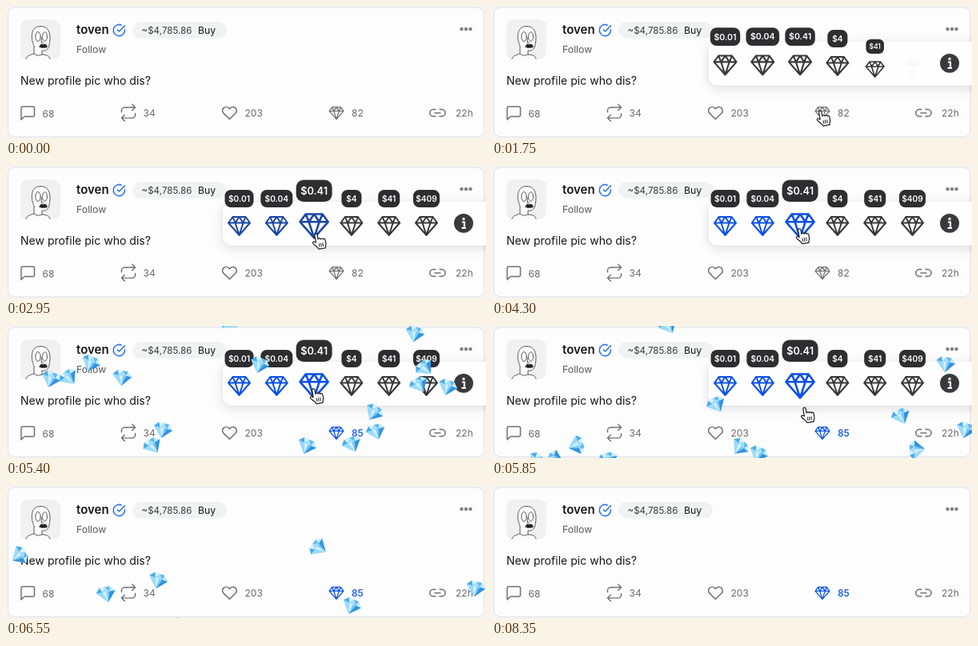
Write an HTML page that moves like this. It is 600 px wide and 166 px high and loops after 9.2 s.

```html
<!DOCTYPE html>
<html lang="en">
<head>
<meta charset="utf-8">
<title>Post card with diamond reactions</title>
<style>
html, body { margin: 0; width: 100%; height: 100%; overflow: hidden; background: #f4f4f5; }
svg { display: block; width: 600px; height: 166px; font-family: Inter, Roboto, sans-serif; }
.icon { fill: none; stroke: #707074; stroke-linecap: round; stroke-linejoin: round; }
.count { font-size: 12px; fill: #68686c; }
.tag { font-size: 10.2px; font-weight: 600; fill: #fff; text-anchor: middle; }
#bar { filter: drop-shadow(0 3px 7px rgba(0, 0, 0, .13)); }
</style>
</head>
<body>
<svg viewBox="0 0 600 166">
  <defs>
    <path id="diamond" d="M-8-11.5H8L13.5-4 0 11.5-13.5-4ZM-13.5-4H13.5M-8-11.5-5-4 0 11.5 5-4 8-11.5M-5-4 0-11.5 5-4"/>
    <g id="gem">
      <path d="M-7-8H6L12-2 1 11-12-2Z" fill="#79c9f4"/>
      <path d="M-7-8-4-2H-12Z" fill="#4aa9ea"/>
      <path d="M-7-8H0L-4-2Z" fill="#d8f3ff"/>
      <path d="M0-8 5-2H-4Z" fill="#a5defa"/>
      <path d="M0-8H6L5-2Z" fill="#5db8f0"/>
      <path d="M6-8 12-2H5Z" fill="#c5ecfe"/>
      <path d="M-12-2H-4L1 11Z" fill="#9cdbf9"/>
      <path d="M5-2H12L1 11Z" fill="#3492df"/>
      <path d="M-4-2H1V11Z" fill="#cdefff"/>
    </g>
  </defs>

  <rect x="2.5" y="2" width="595" height="162.5" rx="8" fill="#fdfdfe" stroke="#e3e3e6"/>

  <rect x="18" y="17" width="50" height="50" rx="9" fill="#f1f1f2"/>
  <g fill="#fcfcfc" stroke="#48484a" stroke-width=".9" stroke-linecap="round">
    <path d="M25 66.5C26 62 31 61.500 35 60V50C31 42 30 25.500 43 25.500S56 39 54 49C53 55 49 57 45 56V61C50 61.500 54 62 55 66.500"/>
    <path d="M35 60Q39 64 45 61" fill="none"/>
    <ellipse cx="40" cy="38.500" rx="3.200" ry="6"/>
    <ellipse cx="48.500" cy="38.500" rx="3" ry="5.800"/>
    <path d="M44.500 40 44 46H46.500" fill="none"/>
    <path d="M42 51.500C42.500 47.500 45 47.500 46.500 48.500 48.500 47.500 51 48 51.500 51.500 49 52.800 44.500 53 42 51.500Z" fill="#222"/>
  </g>

  <text x="88" y="35" font-size="15" font-weight="600" fill="#161618">toven</text>
  <g class="icon" transform="translate(132.800 22) scale(.71)" style="stroke:#2878ec" stroke-width="2.200">
    <path d="M22 11V12a10 10 0 1 1-6-9.140M22 4 12 14 9 11"/>
  </g>
  <rect x="158" y="20" width="118" height="20.500" rx="10.200" fill="#f0f2f3"/>
  <text x="169.500" y="35" font-size="11.600" fill="#3c3c40">~$4,785.86</text>
  <text x="240" y="35" font-size="12.200" fill="#161618">Buy</text>
  <text x="88" y="58.500" font-size="12.300" fill="#58585c">Follow</text>
  <g fill="#808084"><circle cx="569.500" cy="29" r="2.200"/><circle cx="575" cy="29" r="2.200"/><circle cx="580.500" cy="29" r="2.200"/></g>
  <text x="18" y="98.500" font-size="14.050" fill="#161618">New profile pic who dis?</text>

  <g class="icon" stroke-width="1.500">
    <path d="M19 143V128.500a2 2 0 0 1 2-2H33.500a2 2 0 0 1 2 2V137a2 2 0 0 1-2 2H23Z"/>
    <g transform="translate(141.600 122.800) scale(.95)"><path d="M17 1 21 5 17 9M3 11V9A4 4 0 0 1 7 5H21M7 23 3 19 7 15M21 13V15A4 4 0 0 1 17 19H3"/></g>
    <g transform="translate(269.300 124.500) scale(.84)" stroke-width="1.800"><path d="M20.840 4.600a5.500 5.500 0 0 0-7.780 0L12 5.670 10.940 4.600a5.500 5.500 0 0 0-7.780 7.780L12 21.230 20.840 12.400a5.500 5.500 0 0 0 0-7.800Z"/></g>
    <g transform="translate(529 124) scale(.87)" stroke-width="1.800"><path d="M15 7H18a5 5 0 0 1 0 10H15M9 17H6A5 5 0 0 1 6 7H9M8 12H16"/></g>
    <use id="mark" href="#diamond" transform="translate(413 134.800) scale(.66)" stroke-width="1.900"/>
  </g>
  <g class="count">
    <text x="45.500" y="139.500">68</text>
    <text x="171.500" y="139">34</text>
    <text x="298.500" y="139">203</text>
    <text id="total" x="432" y="139">82</text>
    <text x="562" y="139">22h</text>
  </g>

  <g id="popup">
    <g id="bar">
      <rect x="271" y="45" width="360" height="55" rx="12" fill="#fefefe"/>
    </g>
    <circle cx="572" cy="72" r="12" fill="#3a3a3c"/>
    <path d="M570 70.500H573V77.500M569.500 78H575" fill="none" stroke="#fff" stroke-width="2.200"/>
    <circle cx="572" cy="66.500" r="1.700" fill="#fff"/>
    <g id="items"></g>
  </g>
  <g id="rain"></g>
  <g id="hand">
    <g transform="rotate(-10)" stroke="#1c1c1e" stroke-width="1.200" stroke-linejoin="round" stroke-linecap="round">
      <path fill="#fff" d="M-1.700 10.500V1.500a1.700 1.700 0 0 1 3.400 0V7a1.600 1.600 0 0 1 3.100.4 1.600 1.600 0 0 1 3 .6 1.500 1.500 0 0 1 2.600 1.200v4c0 3-1.500 3.500-1.500 6H.5c-.5-2.500-3.500-4.500-5.800-8-1-1.800 1.200-3 2.400-1.600Z"/>
      <path fill="none" stroke-width=".9" d="M2 12.500V16.500M4.300 12.500V16.500M6.600 12.500V16.500"/>
    </g>
  </g>
</svg>
<script>
const LOOP = 9200;
const BLUE = [11, 80, 230], DARK = [56, 56, 58];
const CHOSEN = 2;
const $ = id => document.getElementById(id);
const clamp = v => Math.max(0, Math.min(1, v));
const smooth = v => v * v * (3 - 2 * v);
const phase = (t, start, length) => clamp((t - start) / length);
const mix = (a, b, p) => `rgb(${a.map((v, i) => Math.round(v + (b[i] - v) * p))})`;

function add(parent, tag, attrs, text = '') {
  const el = document.createElementNS('http://www.w3.org/2000/svg', tag);
  for (const key in attrs) el.setAttribute(key, attrs[key]);
  el.textContent = text;
  return parent.appendChild(el);
}

// Interpolates [time, ...values] keys.
function track(t, keys, ease = smooth) {
  if (t <= keys[0][0]) return keys[0].slice(1);
  for (let i = 1; i < keys.length; i++) {
    const [a, b] = [keys[i - 1], keys[i]];
    if (t < b[0]) {
      const p = ease((t - a[0]) / (b[0] - a[0]));
      return a.slice(1).map((v, j) => v + (b[j + 1] - v) * p);
    }
  }
  return keys[keys.length - 1].slice(1);
}

const POP = [[0, .5], [70, .83], [140, 1], [210, 1.04], [350, 1.04], [450, 1]];
const PATH = [[1300, 424, 174], [1500, 410, 132], [2250, 410, 132],
  [3150, 384, 79], [5650, 384, 79], [6250, 408, 170]];

const items = [['$0.01', 36], ['$0.04', 40], ['$0.41', 36], ['$4', 25], ['$41', 27], ['$409', 33]]
  .map(([label, w], i) => {
    const root = add($('items'), 'g', {});
    const icon = add(root, 'use', { href: '#diamond', class: 'icon', 'stroke-width': 2 });
    const tag = add(root, 'g', {});
    add(tag, 'rect', { x: -w / 2, y: -11, width: w, height: 22, rx: 7.5, fill: '#2e2e31' });
    add(tag, 'text', { y: 3.7, class: 'tag' }, label);
    return { root, icon, tag, x: 291.5 + i * 46.8 };
  });

// Each wave: a time, a fall speed and [x, y, angle, drift, speed] at that time.
const waves = [
  [5400, .23, [[56, 66, 20], [78, 64, -35], [106, 46, 25], [145, 64, 10], [196, 130, 15],
    [183, 150, -30], [317, 48, 20, -.0156], [376, 150, 25], [432, 148, -20], [460, 108, 35],
    [462, 132, -15], [523, 52, -40, .0156], [552, 76, 20], [511, 9, 15], [516, 73, -25]]],
  [5850, .23, [[280, 98, -25], [567, 47, 10], [333, 160, 25, .01, .4], [592, 130, 20, .01, .33]]],
  [6550, .25, [[390, 77, -55], [17, 87, 60], [125, 135, -10], [190, 118, 20],
    [432, 150, 25], [587, 128, 15], [220, 174, 10]]]
];
const gems = waves.flatMap(([at, fall, list]) =>
  list.map(([x, y, angle, drift = 0, speed = fall], i) => ({
    at, x, y, angle, drift, speed, spin: (i % 2 ? -1 : 1) * (.05 + i % 3 * .03),
    el: add($('rain'), 'use', { href: '#gem' })
  })));

function drawItems(t) {
  const hover = smooth(phase(t, 2750, 190));
  const tint = mix(DARK, BLUE, phase(t, 2750, 330));
  items.forEach(({ root, icon, tag, x }, i) => {
    const age = t - 1400 - i * 70;
    const [s] = track(age, POP, v => v);
    const grow = i === CHOSEN ? hover : 0;
    root.setAttribute('opacity', clamp(age / 60));
    root.setAttribute('transform', `translate(${x} 100) scale(${s})`);
    icon.setAttribute('transform', `translate(0 -24.500) scale(${1 + .3 * grow})`);
    icon.style.stroke = i <= CHOSEN ? tint : mix(DARK, DARK, 0);
    tag.setAttribute('transform', `translate(0 ${-59 - 9.7 * grow}) scale(${1 + .25 * grow})`);
  });
}

function drawGems(t) {
  $('rain').style.display = t >= 5300 && t < 6980 ? '' : 'none';
  for (const g of gems) {
    const d = t - g.at;
    g.el.setAttribute('transform',
      `translate(${g.x + g.drift * d} ${g.y + g.speed * d}) rotate(${g.angle + g.spin * d})`);
  }
}

function draw(t) {
  const paid = t >= 5100;
  $('total').textContent = paid ? '85' : '82';
  $('total').style.fill = $('mark').style.stroke = paid ? mix(BLUE, BLUE, 0) : '';
  $('total').style.fontWeight = paid ? 500 : 400;

  $('popup').setAttribute('opacity', phase(t, 1380, 170) * (1 - phase(t, 6050, 170)));
  drawItems(t);
  drawGems(t);

  const [x, y] = track(t, PATH);
  const press = t >= 5050 && t < 5150 ? .9 : 1;
  $('hand').style.display = t > 1300 && t < 6250 ? '' : 'none';
  $('hand').setAttribute('transform', `translate(${x} ${y}) scale(${press})`);
}

const start = performance.now();
function frame() {
  draw((performance.now() - start) % LOOP);
  requestAnimationFrame(frame);
}
frame();
</script>
</body>
</html>
```
